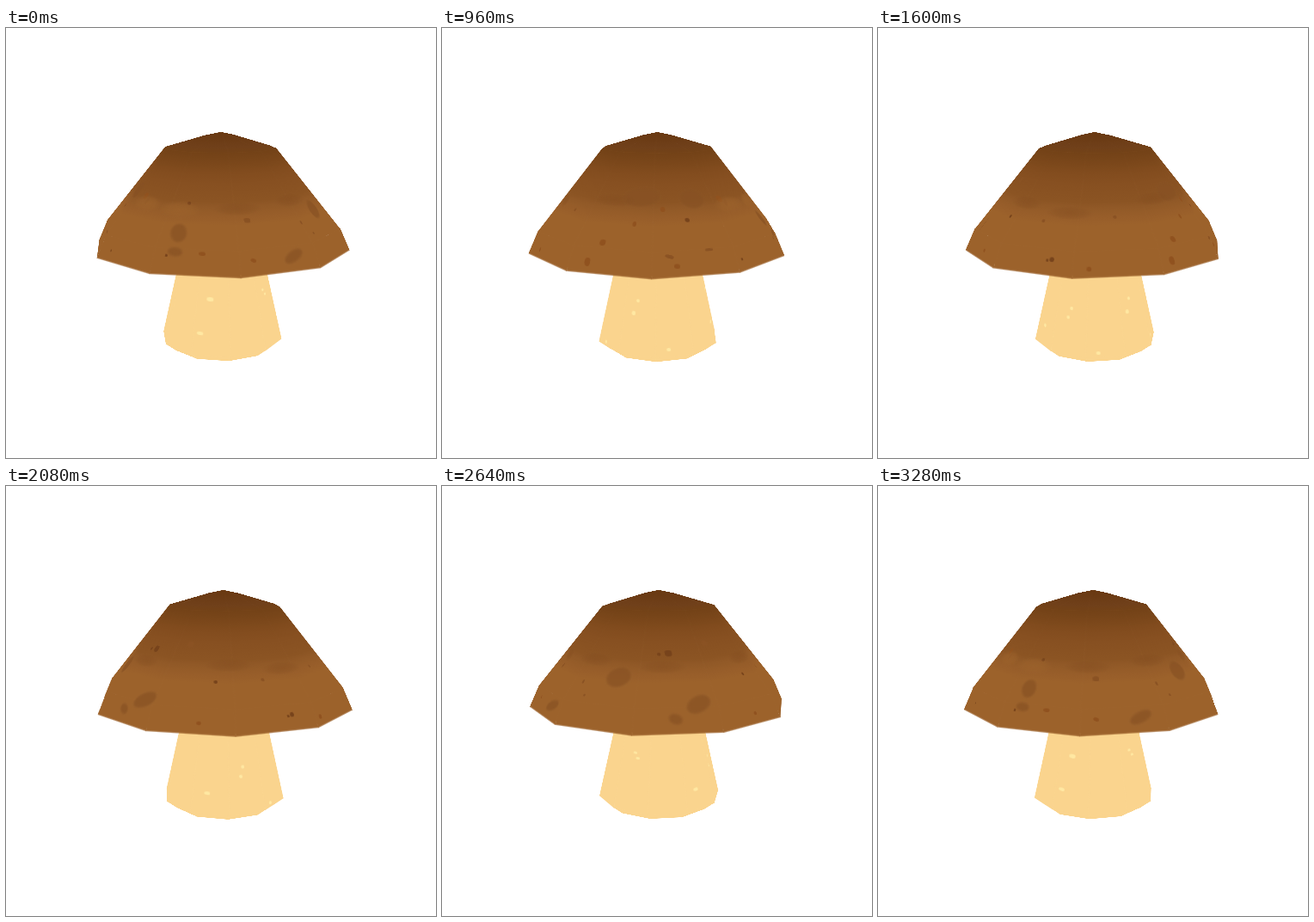
An HTML page without scripts for the animation above (3360 ms loop, 500 px wide and 500 px high).

```html
<!DOCTYPE html>
<html lang="en">
<head>
<meta charset="utf-8">
<title>Turning mushroom</title>
<style>
html, body { margin: 0; width: 100%; height: 100%; overflow: hidden; background: #fff; }
.scene { position: absolute; left: 0; top: 0; width: 500px; height: 500px; perspective: 850px; }
.turn, .band { position: absolute; left: 251.1px; top: 250px; width: 0; height: 0; transform-style: preserve-3d; }
.band { left: 0; top: 0; }
.turn { animation: turn 3360ms -8ms infinite; }
.stem .turn { left: 251.5px; }

@keyframes turn {
  0% { transform: rotateX(-12.5deg) rotateY(0deg) translate3d(-1.65px, 0, -.95px); animation-timing-function: steps(33); }
  78.5714% { transform: rotateX(-12.5deg) rotateY(270deg) translate3d(-1.65px, 0, -.95px); animation-timing-function: steps(8); }
  97.619% { transform: rotateX(-12.5deg) rotateY(347.5deg) translate3d(-1.65px, 0, -.95px); animation-timing-function: steps(1); }
  100% { transform: rotateX(-12.5deg) rotateY(360deg) translate3d(-1.65px, 0, -.95px); }
}

/* one ring of ten trapezoids: --p top half width, --q bottom half width, --l slant, --y/--z top edge, --t tilt */
.band i {
  --w: max(var(--p), var(--q));
  position: absolute; top: 0; left: calc(var(--w) * -1px - .4px);
  width: calc(var(--w) * 2px + .8px); height: calc(var(--l) * 1px + .4px);
  transform-origin: 50% 0;
  transform: rotateY(calc(25.7deg + var(--i) * 36deg)) translate3d(0, calc(var(--y) * 1px), calc(var(--z) * 1px)) rotateX(calc(var(--t) * 1deg));
  clip-path: polygon(calc(50% - var(--p) * 1px - .4px) 0, calc(50% + var(--p) * 1px + .4px) 0, calc(50% + var(--q) * 1px + .4px) 100%, calc(50% - var(--q) * 1px - .4px) 100%);
  background: var(--fill);
}
i:nth-child(1) { --i: 0; } i:nth-child(2) { --i: 1; } i:nth-child(3) { --i: 2; } i:nth-child(4) { --i: 3; } i:nth-child(5) { --i: 4; }
i:nth-child(6) { --i: 5; } i:nth-child(7) { --i: 6; } i:nth-child(8) { --i: 7; } i:nth-child(9) { --i: 8; } i:nth-child(10) { --i: 9; }

.tip { --p: 0; --q: 5.1; --l: 16.1; --y: -127.9; --z: 0; --t: 77.4; --fill: #6a3a13; }
.crown { --p: 5.1; --q: 19.7; --l: 47; --y: -124.4; --z: 15.7; --t: 72.8; --fill: linear-gradient(#6a3a13, #70401a 70%, #734217); }
.slope { --p: 19.7; --q: 42.3; --l: 112.6; --y: -110.5; --z: 60.6; --t: 38.1;
  --fill: linear-gradient(#734217, #7c481b 14%, #824c1e 22%, #875021 34%, #8b5423 52%, #915927 58%, #985e2a 68%, #9c622b 76%); }
.rim { --p: 42.3; --q: 45.7; --l: 26.3; --y: -21.9; --z: 130.1; --t: 23.5; --fill: #9c622b; }
.side { --p: 14.1; --q: 22.1; --l: 115.5; --y: 0; --z: 43.3; --t: 12.35; --fill: #fad48e; }
.foot { --p: 22.1; --q: 18.2; --l: 15.8; --y: 112.8; --z: 68; --t: -49.9; --fill: #fad48e; }

/* flat floor inside each body, so no light shows through the joints */
.floor {
  position: absolute; left: calc(var(--r) * -1px); top: calc(var(--r) * -1px);
  width: calc(var(--r) * 2px); height: calc(var(--r) * 2px); border-radius: 50%;
  background: #9c622b; transform: translateY(calc(var(--y) * 1px)) rotateX(90deg);
}
.stem .floor { background: #fad48e; }

/* marks: --a angle, --s way down the surface, --w/--h size, --k lean */
b {
  --h: var(--w); --k: 0;
  position: absolute; left: calc(var(--w) * -.5px); top: calc(var(--h) * -.5px);
  width: calc(var(--w) * 1px); height: calc(var(--h) * 1px);
  border-radius: 48% 52% 45% 55%; background: #8a5223;
  backface-visibility: hidden;
  transform: rotateY(calc(var(--a) * 1deg)) translate3d(0, calc((var(--y0) + var(--s) * var(--dy)) * 1px), calc((var(--z0) + var(--s) * var(--dz)) * 1px)) rotateX(calc(var(--t0) * 1deg)) rotate(calc(var(--k) * 1deg));
}
.onslope { --y0: -110.5; --dy: 88.6; --z0: 59.5; --dz: 69.5; --t0: 38.1; }
.onrim { --y0: -21.9; --dy: 24.1; --z0: 130.5; --dz: 10.5; --t0: 23.5; }
.onstem { --y0: 0; --dy: 112.8; --z0: 43.3; --dz: 24.7; --t0: 12.35; }
.onstem b { background: #ffe8a2; }
b.d { background: #77431b; }
b.r { background: #90521f; }
b.big { background: #865022; opacity: .7; filter: blur(1px); }
b.wash { --w: 50; --h: 16; background: radial-gradient(closest-side, #824b1e70, #824b1e40 65%, #824b1e00); }
b.lit { --w: 48; --h: 20; background: radial-gradient(closest-side, #9c622bb0, #9c622b70 60%, #9c622b00); }
</style>
</head>
<body>
<div class="scene stem"><div class="turn">
  <div class="floor" style="--r:55;--y:121.5"></div>
  <div class="band side"><i></i><i></i><i></i><i></i><i></i><i></i><i></i><i></i><i></i><i></i></div>
  <div class="band foot"><i></i><i></i><i></i><i></i><i></i><i></i><i></i><i></i><i></i><i></i></div>
</div></div>

<div class="scene stem"><div class="turn"><div class="band onstem">
  <b style="--a:-13;--s:.46;--w:8;--h:5"></b>
  <b style="--a:-22;--s:.8;--w:8;--h:4"></b>
  <b style="--a:60;--s:.43;--w:5;--h:3"></b>
  <b style="--a:64;--s:.48;--w:5;--h:3"></b>
  <b style="--a:-122;--s:.48;--w:4"></b>
  <b style="--a:-126;--s:.6;--w:5"></b>
  <b style="--a:-88;--s:.94;--w:5;--h:4"></b>
  <b style="--a:168;--s:.56;--w:4"></b>
  <b style="--a:165;--s:.65;--w:4"></b>
  <b style="--a:130;--s:.81;--w:7;--h:4"></b>
  <b style="--a:-161;--s:.97;--w:5;--h:4"></b>
</div></div></div>

<div class="scene"><div class="turn">
  <div class="floor" style="--r:139;--y:1.8"></div>
  <div class="band rim"><i></i><i></i><i></i><i></i><i></i><i></i><i></i><i></i><i></i><i></i></div>
  <div class="band slope"><i></i><i></i><i></i><i></i><i></i><i></i><i></i><i></i><i></i><i></i></div>
  <div class="band crown"><i></i><i></i><i></i><i></i><i></i><i></i><i></i><i></i><i></i><i></i></div>
  <div class="band tip"><i></i><i></i><i></i><i></i><i></i><i></i><i></i><i></i><i></i><i></i></div>
</div></div>

<div class="scene"><div class="turn">
  <div class="band onslope">
    <b class="wash" style="--a:10;--s:.6"></b>
    <b class="wash" style="--a:48;--s:.56"></b>
    <b class="wash" style="--a:92;--s:.6"></b>
    <b class="wash" style="--a:150;--s:.58"></b>
    <b class="wash" style="--a:182;--s:.64"></b>
    <b class="wash" style="--a:235;--s:.52"></b>
    <b class="lit" style="--a:-24;--s:.62"></b>
    <b class="lit" style="--a:-50;--s:.6"></b>
    <b class="big" style="--a:-21;--s:.85;--w:17;--h:21;--k:-20"></b>
    <b class="big" style="--a:68;--s:.72;--w:26;--h:22;--k:-25"></b>
    <b class="big" style="--a:-108;--s:.47;--w:36;--h:21;--k:-8"></b>
    <b class="big" style="--a:-76;--s:.5;--w:25;--h:21"></b>
    <b class="big" style="--a:108;--s:.98;--w:28;--h:17;--k:-30"></b>
    <b class="d" style="--a:-19;--s:.55;--w:4"></b>
    <b class="d" style="--a:-82;--s:.71;--w:5"></b>
    <b class="d" style="--a:96;--s:.46;--w:8"></b>
    <b class="d" style="--a:90;--s:.47;--w:4"></b>
    <b class="d" style="--a:143;--s:.75;--w:4"></b>
    <b style="--a:168;--s:.74;--w:4"></b>
    <b class="r" style="--a:-95;--s:.6;--w:5;--h:6"></b>
    <b class="r" style="--a:-56;--s:.53;--w:8"></b>
    <b class="r" style="--a:-124;--s:.95;--w:7"></b>
    <b class="r" style="--a:-110;--s:.75;--w:4;--h:6"></b>
    <b style="--a:-153;--s:.68;--w:4"></b>
    <b style="--a:47;--s:.8;--w:3;--h:5"></b>
    <b style="--a:52;--s:.93;--w:3"></b>
    <b style="--a:14;--s:.72;--w:7;--h:6"></b>
    <b style="--a:124;--s:.37;--w:7"></b>
    <b style="--a:-52;--s:.58;--w:5;--h:8;--k:20"></b>
  </div>
  <div class="band onrim">
    <b class="big" style="--a:-20;--s:.13;--w:16;--h:9"></b>
    <b class="big" style="--a:33;--s:.42;--w:25;--h:11;--k:-22"></b>
    <b class="big" style="--a:97;--s:.45;--w:14;--h:10;--k:15"></b>
    <b class="d" style="--a:-24;--s:.3;--w:3"></b>
    <b class="r" style="--a:-8;--s:.17;--w:7;--h:4"></b>
    <b class="r" style="--a:14;--s:.45;--w:6;--h:4;--k:20"></b>
    <b class="d" style="--a:-59;--s:.6;--w:3"></b>
    <b class="r" style="--a:-129;--s:.6;--w:7;--h:9"></b>
    <b class="r" style="--a:-90;--s:.6;--w:6;--h:5"></b>
    <b style="--a:-75;--s:.05;--w:9;--h:3"></b>
    <b style="--a:-93;--s:.25;--w:9;--h:4;--k:15"></b>
    <b class="d" style="--a:178;--s:.4;--w:5"></b>
    <b class="d" style="--a:176;--s:.44;--w:3"></b>
    <b class="r" style="--a:-166;--s:.7;--w:5"></b>
    <b class="r" style="--a:137;--s:.6;--w:5;--h:4"></b>
  </div>
</div></div>
</body>
</html>
```
